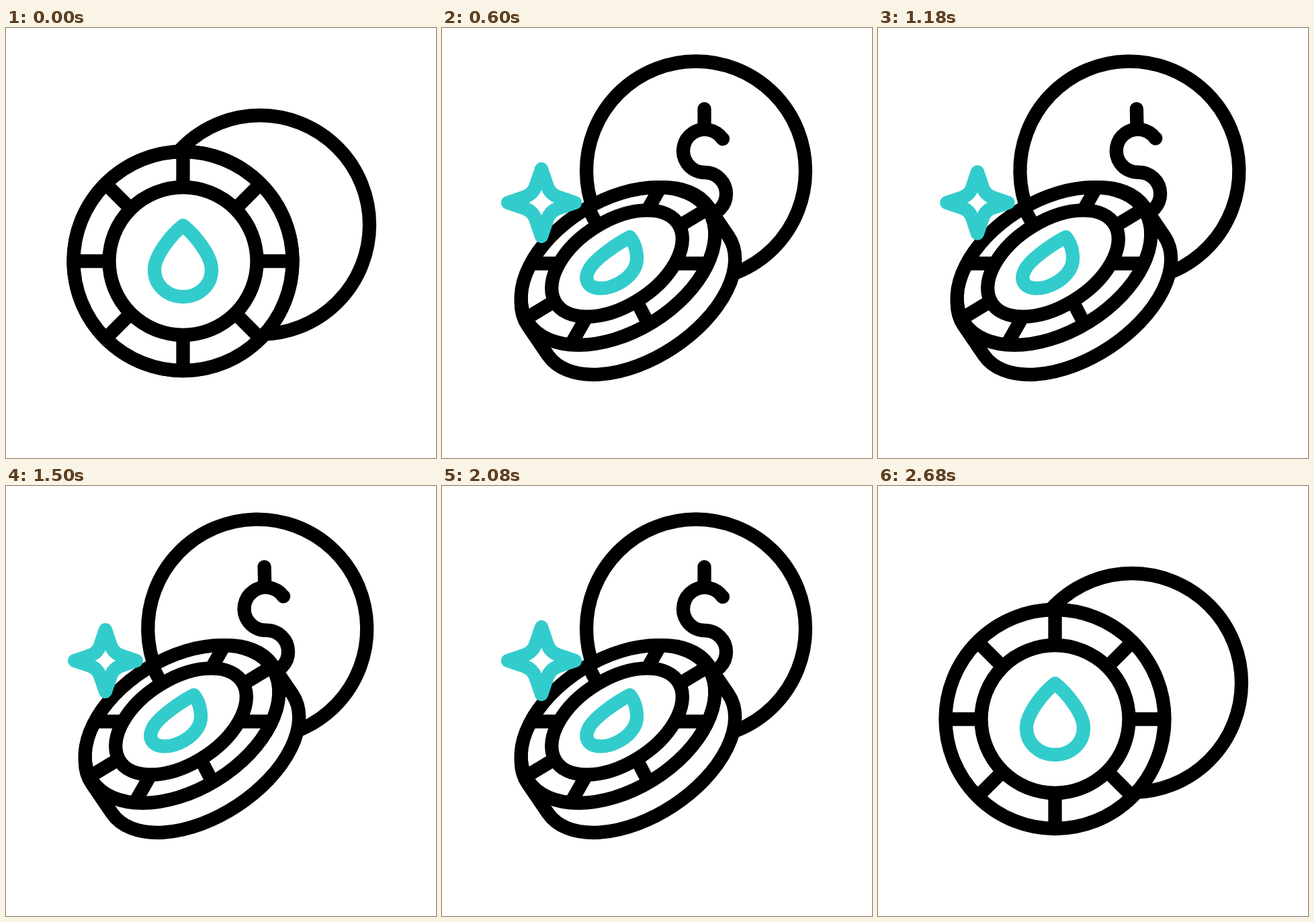
An HTML page with a canvas for the animation above (3600 ms loop, 640 px wide and 640 px high).

```html
<!DOCTYPE html>
<html>
<head>
<meta charset="utf-8">
<style>
  html, body { margin: 0; width: 100%; height: 100%; overflow: hidden; background: #fff; }
  canvas { display: block; width: 640px; height: 640px; }
</style>
</head>
<body>
<canvas id="stage" width="640" height="640"></canvas>
<script>
const ctx = document.getElementById('stage').getContext('2d');
const LOOP = 3600, TILT = 600, HOLD_END = 2080, END = 2680;
const BLACK = '#000', TEAL = '#33cccc';
const OUTER = 163, INNER = 110;

const lerp = (a, b, k) => a + (b - a) * k;
const mix = (p, q, k) => p.map((v, i) => lerp(v, q[i], k));
const smooth = p => p * p * (3 - 2 * p);

// Eased value on evenly spaced keys, p from 0 to 1
function keyed(values, p) {
  const x = p * (values.length - 1);
  const i = Math.min(Math.floor(x), values.length - 2);
  return lerp(values[i], values[i + 1], smooth(x - i));
}

// 0 = coin faces the viewer, 1 = coin lies tilted
function tiltAt(t) {
  if (t < TILT) return smooth(t / TILT);
  if (t < HOLD_END) return 1;
  return t < END ? 1 - smooth((t - HOLD_END) / (END - HOLD_END)) : 0;
}

function paint(color, fill) {
  if (fill) {
    ctx.fillStyle = '#fff';
    ctx.fill();
  }
  ctx.strokeStyle = color;
  ctx.stroke();
}

// Builds a path under a transform, so that the stroke stays even
function trace(matrix, center, build) {
  ctx.save();
  ctx.transform(...matrix, ...center);
  ctx.beginPath();
  build();
  ctx.restore();
}

function shape(matrix, center, build, color, fill) {
  trace(matrix, center, build);
  paint(color, fill);
}

const circle = r => () => ctx.arc(0, 0, r, 0, 2 * Math.PI);

function dollar() {
  ctx.moveTo(12.5, -92);
  ctx.lineTo(12.5, -62);
  ctx.moveTo(40, -47.5);
  ctx.arc(13, -29.5, 32, -0.59, Math.PI / 2, true);
  ctx.arc(13, 34.5, 32, -Math.PI / 2, 2.55);
  ctx.moveTo(12.5, 66);
  ctx.lineTo(12.5, 96);
}

function drop() {
  ctx.moveTo(0, -53);
  ctx.bezierCurveTo(-18, -39, -42.5, -8, -42.5, 13);
  ctx.bezierCurveTo(-42.5, 36, -23.5, 53, 0, 53);
  ctx.bezierCurveTo(23.5, 53, 42.5, 36, 42.5, 13);
  ctx.bezierCurveTo(42.5, -8, 18, -39, 0, -53);
  ctx.closePath();
}

function star() {
  for (let i = 0; i < 4; i++) {
    ctx.lineTo(0, -50);
    ctx.lineTo(9, -23.5);
    ctx.quadraticCurveTo(13.2, -13.2, 23.5, -9);
    ctx.rotate(Math.PI / 2);
  }
  ctx.closePath();
}

function drawBackCoin(k, wobble) {
  const x = 378, y = lerp(293, 212.5, k), size = lerp(0.43, 1, k);
  ctx.save();
  ctx.translate(x, 375);
  ctx.rotate(wobble * Math.PI / 60);
  ctx.translate(-x, -375);
  shape([1, 0, 0, 1], [x, y], circle(OUTER), BLACK, true);
  if (k > 0) {
    ctx.lineCap = 'round';
    shape([size, 0, 0, size], [x - 6 * (1 - k), y - 4 * (1 - k)], dollar, BLACK);
    ctx.lineCap = 'butt';
  }
  ctx.restore();
}

function drawRim(m, center, k) {
  const dx = 30, dy = 44;
  const a = Math.atan2(m[2] * dy - m[3] * dx, m[0] * dy - m[1] * dx);
  // Half an ellipse, joined to the face along its tangents
  trace(m, center, () => {
    ctx.arc(0, 0, OUTER, a + Math.PI, a);
    ctx.setTransform(1, 0, 0, 1, dx * k, dy * k);
    ctx.transform(...m, ...center);
    ctx.arc(0, 0, OUTER, a, a + Math.PI);
    ctx.closePath();
  });
  paint(BLACK, true);
}

function drawFrontCoin(k) {
  const flat = [1, 0, 0, 1], start = [263.5, 347];
  const m = mix(flat, [0.784, 0, -0.41, 0.72], k);
  const face = mix(flat, [0.809, 0, -0.36, 0.72], k);
  const outer = mix(start, [262, 354.5], k);
  const inner = mix(start, [260.5, 350.5], k);

  if (k > 0) drawRim(m, outer, k);
  shape(face, outer, circle(OUTER), BLACK, true);

  // Spokes run out from the inner ring and end under the outer one
  ctx.save();
  ctx.clip();
  shape(m, inner, () => {
    for (let i = 0; i < 8; i++) {
      const a = i * Math.PI / 4;
      ctx.moveTo(0, 0);
      ctx.lineTo(200 * Math.cos(a), 200 * Math.sin(a));
    }
  }, BLACK);
  ctx.restore();

  shape(m, inner, circle(INNER), BLACK, true);
  shape(m, mix(start, [258, 349.3], k), drop, TEAL);
}

function draw(t) {
  const k = tiltAt(t);
  const p = Math.min(Math.max((t - TILT) / (HOLD_END - TILT), 0), 1);
  ctx.fillStyle = '#fff';
  ctx.fillRect(0, 0, 640, 640);
  ctx.lineWidth = 20.3;
  ctx.lineJoin = 'round';
  drawBackCoin(k, keyed([0, 1, -1, 1, -1, 1, 0], p));
  drawFrontCoin(k);
  if (k > 0.01) {
    const size = k ** 0.75 * keyed([1, 0.7, 1, 0.7, 1, 0.7, 1], p);
    shape([size, 0, 0, size], [148, 260], star, TEAL, true);
  }
}

const start = performance.now();
function tick() {
  draw((performance.now() - start) % LOOP);
  requestAnimationFrame(tick);
}
tick();
</script>
</body>
</html>
```
